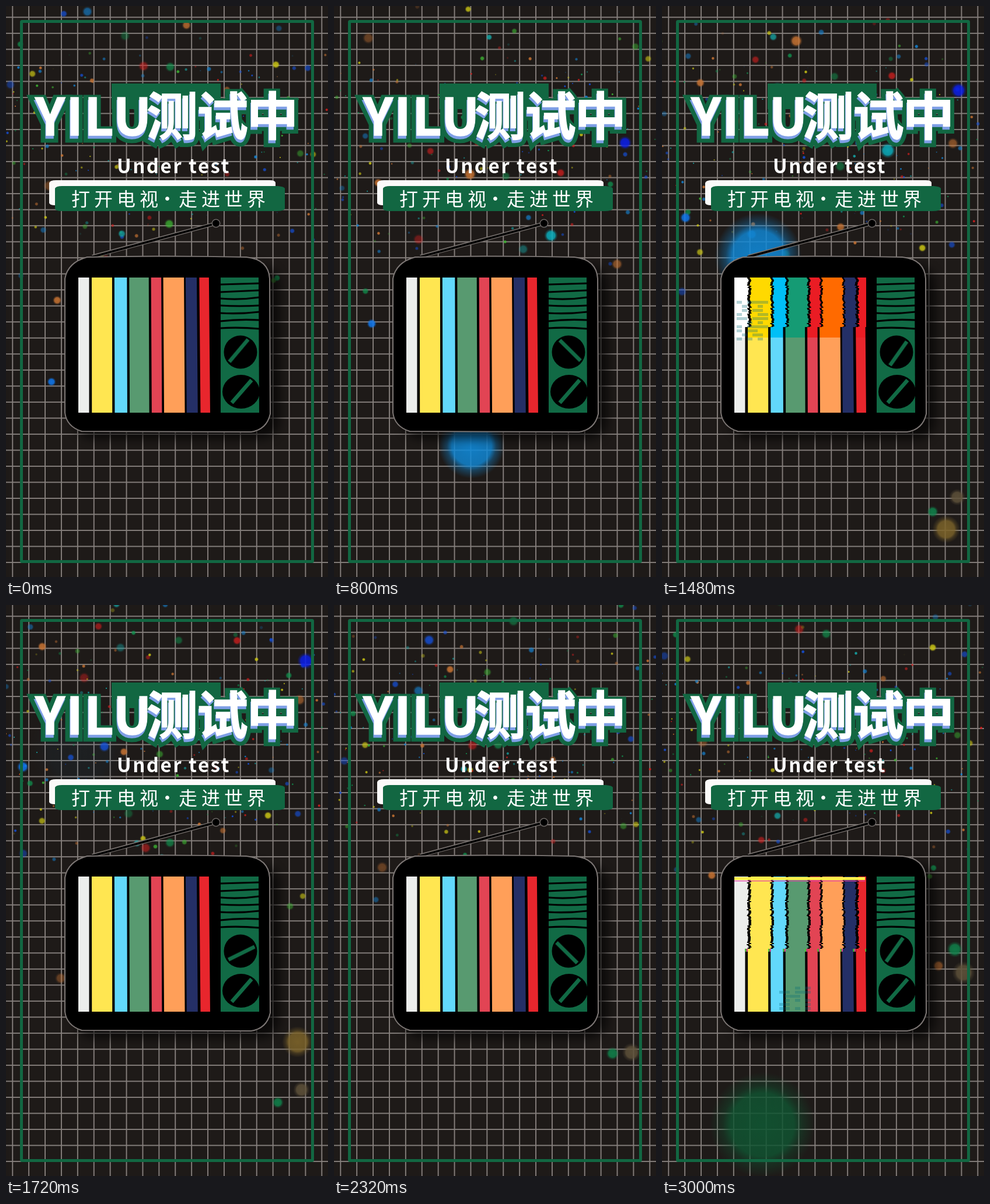
Animation, 552 px wide and 980 px high, one loop 3040 ms. Source, as an HTML page with a canvas:

```html
<!DOCTYPE html>
<html lang="zh-CN">
<head>
<meta charset="utf-8">
<title>测试中</title>
<style>
  html, body { margin: 0; width: 100%; height: 100%; overflow: hidden; background: #1e1a18; }
  canvas, svg { position: absolute; left: 0; top: 0; width: 552px; height: 980px; }
  text { font-family: "Noto Sans CJK SC", "Noto Sans CJK", "Noto Sans", sans-serif; }
  .title { font-size: 88px; font-weight: 900; }
  .sub { font-size: 33px; font-weight: 700; letter-spacing: 2.5px; }
  .banner { font-size: 32px; letter-spacing: 7px; }
  .knob { transform-origin: 402px 594px; animation: turn 3040ms steps(76) infinite; }
  @keyframes turn { from { transform: rotate(-50deg); } to { transform: rotate(310deg); } }
</style>
</head>
<body>
<canvas id="back" width="552" height="980"></canvas>
<svg viewBox="0 0 552 980">
  <defs>
    <filter id="soft" x="-20%" y="-20%" width="140%" height="140%"><feGaussianBlur stdDeviation="9"/></filter>
    <g id="title" class="title">
      <text x="50" y="222" letter-spacing="2">YILU</text>
      <text x="241" y="221" letter-spacing="-2">测试中</text>
    </g>
  </defs>

  <rect x="26.5" y="26.5" width="499" height="927" rx="1" fill="none" stroke="#126742" stroke-width="5"/>

  <rect x="181" y="133" width="187" height="44" fill="#126742"/>
  <use href="#title" x="-1" y="4" fill="#126742" stroke="#126742" stroke-width="17" stroke-miterlimit="3"/>
  <use href="#title" x="-1" y="5" fill="#7f9fe6" stroke="#7f9fe6" stroke-width="1.4"/>
  <use href="#title" fill="#fff" stroke="#fff" stroke-width="1.4"/>

  <text class="sub" x="287.5" y="287" text-anchor="middle" fill="#fff">Under test</text>

  <path d="M74 304Q75 299 86 299H452Q461 299 462 303V338Q460 342 450 342H84Q75 342 74 338Z" fill="#fbfaf9"/>
  <path d="M84 313Q86 309 96 309H466Q477 310 478 313V348Q476 352 464 352H96Q85 352 84 348Z" fill="#126742"/>
  <g class="banner" fill="#fff">
    <text x="112" y="343">打开电视</text>
    <text x="280" y="343" text-anchor="middle">·</text>
    <text x="296" y="343">走进世界</text>
  </g>

  <rect x="118" y="446" width="351" height="297" rx="32" fill="#000" opacity=".65" filter="url(#soft)"/>
  <path d="M148 430L357 374" stroke="#77716e" stroke-width="6.4"/>
  <path d="M146 431L357 374" stroke="#000" stroke-width="3.6"/>
  <circle cx="360" cy="373" r="6.8" fill="#000" stroke="#6b6664" stroke-width="1.5"/>
  <path d="M139 431Q275 428 412 431Q450 435 452 468L453 700Q447 727 420 731L130 730Q104 722 101 698V468Q106 440 139 431Z" fill="#000" stroke="#7d7775" stroke-width="2"/>

  <path d="M368 466H433L434 698H368Z" fill="#116a45"/>
  <path d="M367 478L434 476M367 491L434 488M367 502Q400 505 434 500M367 514Q400 516 434 514M367 527Q400 529 434 525M367 541Q400 537 434 539M367 553Q400 551 434 554" fill="none" stroke="#000" stroke-width="3.2"/>
  <circle cx="402" cy="594" r="28.5"/>
  <ellipse cx="403" cy="662" rx="32" ry="29"/>
  <path class="knob" d="M377 590H427" stroke="#116a45" stroke-width="6.5"/>
  <path d="M387 681L421 642" stroke="#116a45" stroke-width="6.5"/>
</svg>
<canvas id="front" width="552" height="980"></canvas>

<script>
const LOOP = 3040, STEP = 40;
const TOP = 466, BOTTOM = 698;
const back = document.getElementById('back').getContext('2d');
const front = document.getElementById('front').getContext('2d');

const frac = n => n - Math.floor(n);
const noise = n => frac(Math.sin(n * 12.9898 + 4.1) * 43758.5453);
const mix = (a, b, p) => a + (b - a) * p;
// starts slowly and keeps speeding up, also outside 0..1
const lift = p => p * (.2 + .8 * Math.abs(p));

// large lights: time, x and y at two moments
const lights = [
  { rgb: '16,137,216', r: 38, from: [.48, 248, 810], to: [1.48, 165, 430] },
  { rgb: '15,120,240', r: 5.5, from: [0, 78, 645], to: [1.96, 16, 181] },
  { rgb: '10,30,235', r: 8, from: [.48, 497, 252], to: [1.96, 520, 38] },
  { rgb: '10,175,190', r: 8, from: [.48, 369, 422], to: [1.96, 405, 74] },
  { rgb: '15,130,75', r: 7, from: [1.48, 464, 868], to: [3, 502, 591] },
  { rgb: '95,82,58', r: 10, from: [1.48, 506, 843], to: [3, 517, 631] },
  { rgb: '125,100,42', r: 17, from: [1.48, 487, 898], to: [1.96, 530, 404] },
  { rgb: '16,85,50', r: 46, from: [2.72, 160, 965], to: [3, 172, 892] }
];

const hues = ['215,30,30', '15,150,80', '20,170,170', '20,80,220', '200,195,20', '200,115,50', '60,180,50', '20,130,210'];
const dust = Array.from({ length: 230 }, (_, i) => {
  const u = noise(i + 900);
  const r = 1 + 3 * u ** 2 + 4 * u ** 12;
  return {
    r, x: noise(i + 100) * 552, phase: noise(i + 300),
    reach: 80 + 50 * r, speed: 30 + 40 * r,
    alpha: .4 + .6 * noise(i + 500), rgb: hues[Math.floor(noise(i + 700) * hues.length)]
  };
});

function dot(x, y, r, rgb, alpha) {
  const R = r * 1.4;
  if (alpha <= 0 || y < -R || y > 980 + R) return;
  const g = back.createRadialGradient(x, y, 0, x, y, R);
  g.addColorStop(0, `rgba(${rgb},1)`);
  g.addColorStop(.6, `rgba(${rgb},.9)`);
  g.addColorStop(.75, `rgba(${rgb},.4)`);
  g.addColorStop(1, `rgba(${rgb},0)`);
  back.globalAlpha = Math.min(.9, alpha);
  back.fillStyle = g;
  back.fillRect(x - R, y - R, 2 * R, 2 * R);
}

function drawBack(t) {
  back.globalAlpha = 1;
  back.fillStyle = '#1e1a18';
  back.fillRect(0, 0, 552, 980);
  back.fillStyle = '#857f7c';
  for (let x = 10.3; x < 552; x += 27.9) back.fillRect(x, 0, 1.9, 980);
  for (let y = 18.4; y < 980; y += 27.52) back.fillRect(0, y, 552, 1.9);

  for (const d of dust) {
    const span = 2 * d.reach;
    const rise = frac(d.phase + t * d.speed / span) * span;
    const fade = Math.min(1, rise / 25, (span - rise) / 25);
    const spread = (d.x / 276 - 1) * .08 * (rise - d.reach);
    dot(d.x + spread, 235 + d.reach - rise, d.r, d.rgb, d.alpha * fade);
  }
  for (const { rgb, r, from: [t0, x0, y0], to: [t1, x1, y1] } of lights) {
    const p = lift((t - t0) / (t1 - t0));
    const fade = Math.min(t - t0 + .25, t1 + .25 - t) / .2;
    dot(mix(x0, x1, p), mix(y0, y1, p), r * (1 + .4 * Math.max(0, p)), rgb, fade);
  }
}

const stripes = [
  { plain: '#eceeec', vivid: '#fff', x: 124, w: 18.5 },
  { plain: '#ffe651', vivid: '#ffd900', x: 147, w: 35 },
  { plain: '#62d8fb', vivid: '#00bff6', x: 186, w: 21.5 },
  { plain: '#589a70', vivid: '#159b74', x: 211.5, w: 33.5 },
  { plain: '#e24454', vivid: '#ea1c24', x: 249, w: 17.5 },
  { plain: '#ff9f59', vivid: '#ff6a00', x: 270, w: 35.5 },
  { plain: '#242f66', vivid: '#242f66', x: 308.5, w: 19 },
  { plain: '#e8262d', vivid: '#ea1c24', x: 332, w: 16.5 }
];

// torn part of the screen: active time, pose time, band, sideways shift, patch of noise
const glitches = [
  { start: 360, end: 640, at: 480, y: 507, h: 111, shift: 0, tone: 'vivid', patch: [192, 573, 66, 63] },
  { start: 1280, end: 1640, at: 1480, y: 466, h: 85, shift: 5, tone: 'vivid', patch: [128, 506, 54, 64] },
  { start: 2760, end: LOOP, at: 3000, y: 466, h: 124, shift: 4.5, tone: 'plain', patch: [192, 655, 63, 43] }
];

function box(color, x, y, w, h) {
  front.fillStyle = color;
  front.fillRect(x, y, w, h);
}

function band(y0, y1, tone, shift = 0, jag = 0, seed = 0) {
  y1 = Math.min(BOTTOM, y1);
  if (y1 <= y0) return;
  box('#000', 124, y0, 227, y1 - y0);
  for (let y = y0; y < y1; y += 2) {
    const h = Math.min(2, y1 - y), p = (y - TOP) / (BOTTOM - TOP);
    const dx = shift + jag * (noise(y + seed * 7) - .5);
    stripes.forEach((s, i) => {
      const lean = i * .3 * (p - .3);
      const left = i ? s.x + lean + dx : 124;
      box(s[tone], left, y, s.x + s.w + lean + dx - left, h);
    });
  }
}

function noisePatch(x0, y0, w, h) {
  front.globalAlpha = .3;
  for (let y = y0; y < y0 + h; y += 7)
    for (let x = x0; x < x0 + w; x += 9)
      if (noise(x * 3 + y) > .55) box('#066a78', x, y, 9, 5);
  front.globalAlpha = 1;
}

function fringes(y, shift) {
  for (const s of stripes) {
    box('#3fd02a', s.x + s.w, y, shift / 2, 5);
    box('#d83a8a', s.x + s.w + shift / 2, y, shift / 2, 5);
  }
}

function drawScreen(ms) {
  front.clearRect(0, 0, 552, 980);
  front.save();
  front.beginPath();
  front.rect(124, TOP, 226, BOTTOM - TOP);
  front.clip();
  band(TOP, BOTTOM, 'plain');
  const g = glitches.find(g => ms >= g.start && ms < g.end);
  if (g) {
    const slide = (ms - g.at) / 4, end = g.y + g.h + slide;
    const [px, py, pw, ph] = g.patch;
    band(Math.max(TOP, g.y + Math.min(0, slide)), end, g.tone, g.shift, 3.5, ms / STEP);
    band(end, end + 18, g.tone);
    noisePatch(px, py + slide, pw, ph);
    if (g.tone === 'plain') {
      fringes(end, g.shift);
      box('#ffee4a', 124, TOP + 1, 224, 5);
      box('#e63caa', 124, TOP + 7, 224, 1.2);
    }
  }
  front.restore();
}

let start;
function tick(now) {
  start ??= now;
  const ms = Math.floor((now - start) % LOOP / STEP) * STEP;
  drawBack(ms / 1000);
  drawScreen(ms);
  requestAnimationFrame(tick);
}
requestAnimationFrame(tick);
</script>
</body>
</html>
```
